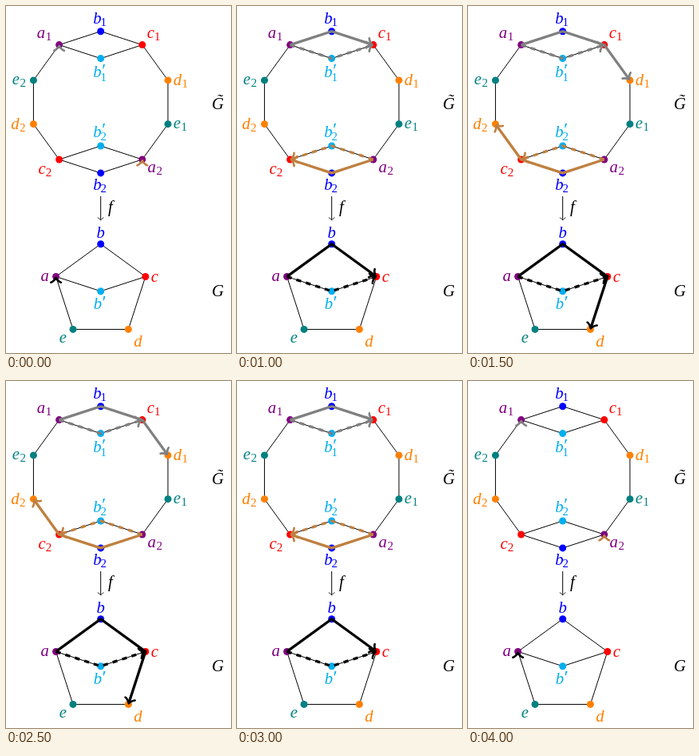
An HTML page for the animation above (4500 ms loop, 282 by 434 pixels).

```html
<!DOCTYPE html>
<html lang="en">
<head>
<meta charset="utf-8">
<title>Path lifting in a double cover</title>
<style>
  html, body { margin: 0; width: 100%; height: 100%; overflow: hidden; background: #fff; }
  svg { display: block; width: 282px; height: 434px; }
  text { font: italic 20.75px "Liberation Serif", serif; }
  .sub { font-style: normal; font-size: 15px; }
  .prime { font-size: 23px; }
</style>
</head>
<body>
<svg viewBox="0 0 282 434"><g id="graph"></g><g id="walks"></g></svg>
<script>
const BLACK = '#000', GRAY = '#808080', BROWN = '#bf8040';
const COLORS = { a: '#800080', b: '#0000ff', c: '#ff0000', d: '#ff8000', e: '#008080', p: '#00aeef' };
const PT = 150 / 72.27; // pixels per point
const THIN = 1, THICK = 1.6 * PT, DASH = 3 * PT;
const STEP_MS = 500, CX = 118.7;

// Vertices run clockwise from the top.
const polygon = (n, cy, r) => Array.from({ length: n }, (_, k) => {
  const angle = 2 * Math.PI * k / n - Math.PI / 2;
  return [CX + r * Math.cos(angle), cy + r * Math.sin(angle)];
});
const cover = polygon(10, 120.3, 88.6);
const base = polygon(5, 356.7, 59);
const pick = (points, ...indices) => indices.map(i => points[i]);

const walks = [
  { color: GRAY, route: pick(cover, 9, 0, 1, 2, 3), detour: [CX, 65.6] },
  { color: BROWN, route: pick(cover, 4, 5, 6, 7, 8), detour: [CX, 175] },
  { color: BLACK, route: pick(base, 4, 0, 1, 2, 3), detour: [CX, 356.7] }
];

const line = (points, color, width, extra = '') =>
  `<path d="M${points.join('L')}" fill="none" stroke="${color}" stroke-width="${width}" ${extra}/>`;

function arrow(points, color, width, dash = '') {
  const unit = 0.28 * PT + 0.3 * width;
  const inset = 0.75 * unit + 0.4 * width;
  const end = points.at(-1);
  const prev = points.at(-2) || [end[0], end[1] + 1];
  const angle = Math.atan2(end[1] - prev[1], end[0] - prev[0]);
  const tail = [end[0] - inset * Math.cos(angle), end[1] - inset * Math.sin(angle)];
  const shaft = points.length > 1 ? line([...points.slice(0, -1), tail], color, width, dash) : '';
  const u = n => n * unit;
  return shaft + `<path transform="translate(${tail}) rotate(${angle * 180 / Math.PI})"
    d="M${u(-3)} ${u(-4)}C${u(-2.75)} ${u(-2.5)} 0 ${u(-.25)} ${u(.75)} 0C0 ${u(.25)} ${u(-2.75)} ${u(2.5)} ${u(-3)} ${u(4)}"
    fill="none" stroke="${color}" stroke-width="${0.8 * width}" stroke-linecap="round" stroke-linejoin="round"/>`;
}

const text = (x, y, string, color = BLACK, cls = '') =>
  `<text x="${x}" y="${y}" fill="${color}" class="${cls}">${string}</text>`;

const SUB_OFFSET = { a: 11, b: 9.3, c: 9.3, d: 10.8, e: 9.8 };
function label(name, x, y) {
  const letter = name[0], primed = name.includes("'"), index = name.match(/\d/);
  const color = COLORS[primed ? 'p' : letter];
  return text(x, y, letter, color)
    + (primed ? text(x + 9.5, y - 1.5, '′', color, 'prime') : '')
    + (index ? text(x + SUB_OFFSET[letter], y + (primed ? 4.5 : 3), index[0], color, 'sub') : '');
}

const dot = ([x, y], color) => `<circle cx="${x}" cy="${y}" r="4.5" fill="${color}"/>`;

function drawGraph() {
  const edges = [cover, base].map(p => line([...p, p[0]], BLACK, THIN)).join('')
    + walks.map(w => line([w.route[0], w.detour, w.route[2]], BLACK, THIN)).join('');
  const dots = walks.map(w =>
    w.route.map((p, i) => dot(p, COLORS['abcde'[i]])).join('') + dot(w.detour, COLORS.p)).join('');
  const labels = [
    ['a1', 38.7, 39.7], ['b1', 109.3, 21.5], ['c1', 176.7, 39.7], ['d1', 209.7, 98.8], ['e1', 209.7, 152.7],
    ['a2', 177.5, 208.3], ['b2', 109.3, 230], ['c2', 40.5, 210], ['d2', 6.2, 154], ['e2', 7.8, 97.6],
    ["b'1", 109.3, 89], ["b'2", 109.3, 163.5],
    ['a', 43.5, 344], ['b', 113.6, 289.6], ['c', 181.7, 344.5], ['d', 160.2, 426], ['e', 66.7, 421], ["b'", 109.8, 379]
  ].map(args => label(...args)).join('');
  return edges + dots + labels
    + arrow([[CX, 238], [CX, 268.5]], BLACK, THIN)
    + text(128, 258, 'f') + text(258, 129, 'G') + text(264, 125, '˜') + text(258, 363.3, 'G');
}

function drawWalks(step) {
  return walks.map(({ color, route, detour }) =>
    (step > 1 ? arrow([route[0], detour, route[2]], color, THICK, `stroke-dasharray="${DASH}"`) : '')
    + arrow(route.slice(0, step + 1), color, THICK)).join('');
}

document.getElementById('graph').innerHTML = drawGraph();
const layer = document.getElementById('walks');
const start = performance.now();
let shown = -1;

function frame() {
  const tick = Math.floor((performance.now() - start) / STEP_MS) % 9;
  const step = 4 - Math.abs(4 - tick); // forward to the fourth edge, then back
  if (step !== shown) layer.innerHTML = drawWalks(shown = step);
  requestAnimationFrame(frame);
}
frame();
</script>
</body>
</html>
```
